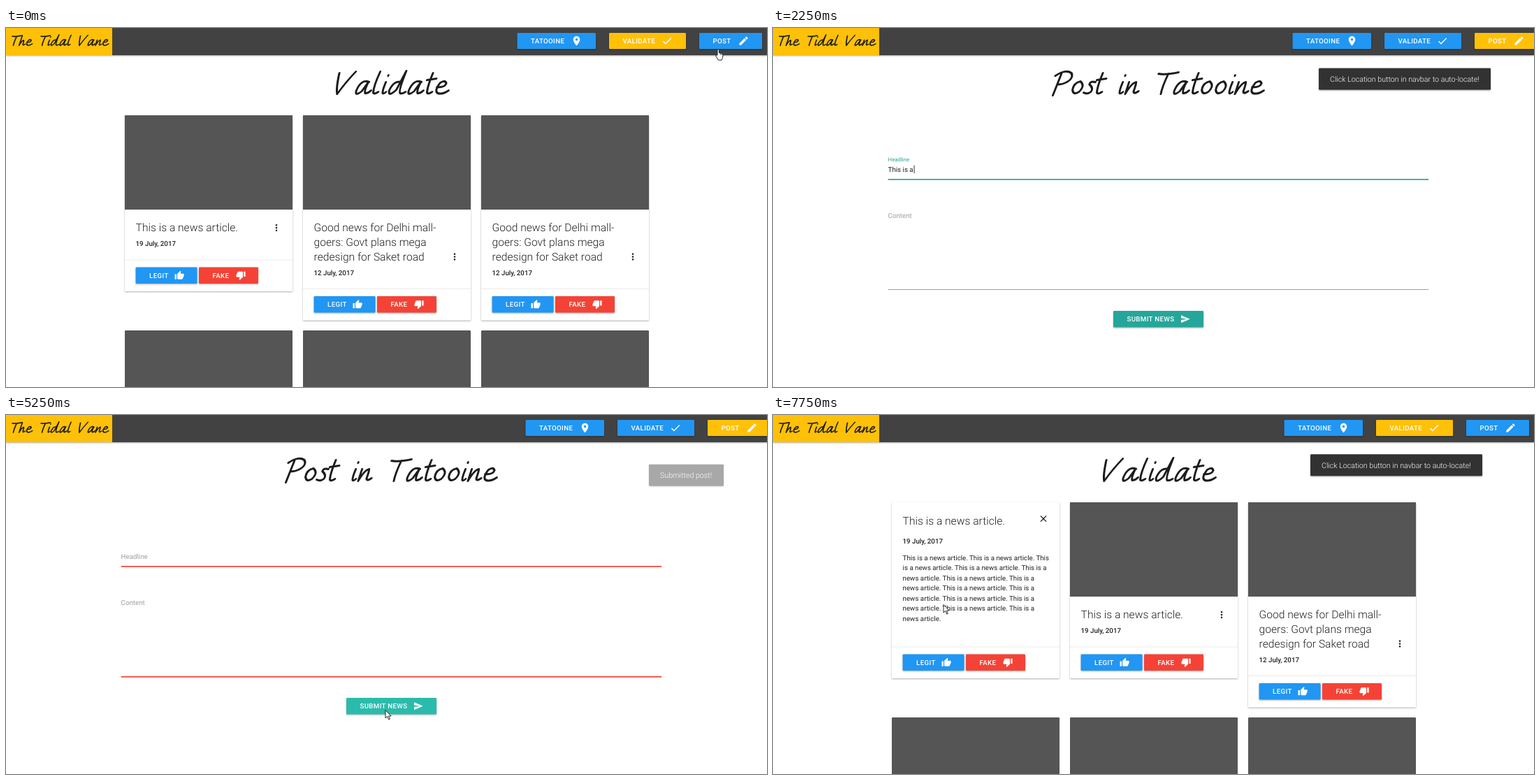
Recreate the animation shown at these times as an HTML page. Size 1089 by 514 pixels, loop 8 s.

```html
<!DOCTYPE html>
<html lang="en">
<head>
<meta charset="utf-8">
<title>News board</title>
<style>
  html, body { margin: 0; width: 100%; height: 100%; overflow: hidden; background: #fff; }
  svg { display: block; width: 100%; height: 100%; }
  text { font-family: Roboto, sans-serif; text-rendering: geometricPrecision; white-space: pre; }
  .btn { font-size: 9.73px; font-weight: 500; letter-spacing: .33px; }
  .body { font-size: 9.73px; }
  .date { font-size: 9.73px; font-weight: 500; }
  .small { font-size: 7.8px; }
  .title { font-size: 15.6px; font-weight: 300; }
  .toast { font-size: 10.7px; font-weight: 300; }
  .tip { font: 8px "Open Sans", sans-serif; }
  .lift { filter: drop-shadow(0 1px 1px rgba(0,0,0,.32)); }
  .script { fill: none; stroke-linecap: round; stroke-linejoin: round; }
</style>
</head>
<body>
<svg id="stage" viewBox="0 0 1089 514" xmlns="http://www.w3.org/2000/svg"></svg>
<script>
const stage = document.getElementById('stage');
const LOOP = 8000, STEP = 250;
const BLUE = '#2196f3', AMBER = '#ffc107', RED = '#f44336', TEAL = '#26a69a';
const GREY = '#9e9e9e', INK = '#212121', SLATE = '#555';
const LINE = 'This is a news article.';
const HINT = 'Click Location button in navbar to auto-locate!';
const STORY = ['Good news for Delhi mall-', 'goers: Govt plans mega', 'redesign for Saket road'];

// Handwritten letters: advance, then pen strokes on a zero baseline
const pen = {
  V: [30, 'M2-30Q3-8 7 0Q14-16 25-32'],
  a: [24, 'M18-17Q6-22 3-5Q3 4 11-4L17-17Q14-3 17-1Q21-1 24-5'],
  l: [14, 'M6-32Q2-12 4-2Q6 1 11-3'],
  i: [9, 'M4-17Q2-3 4-1Q6 0 8-3M5-26v-1'],
  d: [28, 'M17-17Q6-20 3-5Q4 5 13-6L20-33Q16-3 20-1Q23 0 27-3'],
  t: [15, 'M7-30Q4-10 6-2Q8 1 13-3M1-20L14-22'],
  e: [21, 'M3-10Q14-9 15-15Q12-21 6-16Q0-4 7-1Q14 1 21-5'],
  o: [20, 'M11-18Q2-16 3-6Q6 2 13-3Q20-12 11-18'],
  s: [13, 'M13-17Q5-19 5-14Q13-8 10-3Q6 1 0-2'],
  n: [22, 'M4-17L3 0Q8-16 14-17Q15-14 14-4Q15 1 21-4'],
  h: [22, 'M5-31L3 0Q8-16 13-16Q15-13 14-4Q15 1 21-4'],
  P: [27, 'M8-29L4 2M0-26Q12-36 22-30Q28-22 17-16Q12-13 6-14'],
  T: [27, 'M1-29Q10-27 29-31M15-29Q11-10 12 0'],
  ' ': [20, '']
};

// Icons on a 24 unit grid
const thumb = 'M1 21h4V9H1zM23 10c0-1.1-.9-2-2-2h-6.3l1-4.6c.1-.5-.1-1-.4-1.3L14.2 1 7.6 7.6C7.2 8 7 8.4 7 9v10c0 1.1.9 2 2 2h9c.8 0 1.5-.5 1.8-1.2l3-7.1c.1-.2.2-.5.2-.7z';
const icons = {
  pin: 'M12 2C8.1 2 5 5.1 5 9c0 5.3 7 13 7 13s7-7.7 7-13c0-3.9-3.1-7-7-7zm0 9.5a2.5 2.5 0 1 1 0-5 2.5 2.5 0 0 1 0 5z',
  check: 'M9 16.2L4.8 12l-1.4 1.4L9 19 21 7l-1.4-1.4z',
  pencil: 'M3 17.2V21h3.8L17.8 9.9l-3.7-3.7zM20.7 7c.4-.4.4-1 0-1.4l-2.3-2.3c-.4-.4-1-.4-1.4 0l-1.9 1.8 3.8 3.8z',
  send: 'M2 21L23 12 2 3v7l15 2-15 2z',
  close: 'M19 6.4L17.6 5 12 10.6 6.4 5 5 6.4l5.6 5.6L5 17.6 6.4 19l5.6-5.6 5.6 5.6 1.4-1.4-5.6-5.6z',
  dots: 'M12 4a2 2 0 1 0 .01 0zM12 10a2 2 0 1 0 .01 0zM12 16a2 2 0 1 0 .01 0z',
  up: thumb,
  down: thumb
};

const rect = (x, y, w, h, fill, more = '') =>
  `<rect x="${x}" y="${y}" width="${w}" height="${h}" fill="${fill}" ${more}/>`;
const text = (x, y, s, cls, fill = INK, more = '') =>
  `<text x="${x}" y="${y}" class="${cls}" fill="${fill}" ${more}>${s}</text>`;
const icon = (name, x, y, k, fill = '#fff') =>
  `<path d="${icons[name]}" fill="${fill}" transform="translate(${x} ${y}) scale(${k}) ${name === 'down' ? 'rotate(180)' : ''} translate(-12 -12)"/>`;

function script(s, x, y, k, weight) {
  let at = 0, out = '';
  for (const c of s) {
    out += `<path d="${pen[c][1]}" transform="translate(${at}) skewX(-15)"/>`;
    at += pen[c][0];
  }
  return `<g class="script" role="img" aria-label="${s}" stroke="#1c1c1c" stroke-width="${weight / k}" transform="translate(${x} ${y}) scale(${k})">${out}</g>`;
}

function button(x, y, w, h, fill, label, name, iconX, k, ripple) {
  let wave = '';
  if (ripple) {
    const [cx, cy, r] = ripple;
    wave = `<clipPath id="wave">${rect(x, y, w, h, '#000')}</clipPath>
      <circle cx="${cx}" cy="${cy}" r="${r}" fill="#000" opacity=".1" clip-path="url(#wave)"/>`;
  }
  return rect(x, y, w, h, fill, 'rx="1.3" class="lift"') + wave +
    text(x + 19.5, y + h / 2 + 3.5, label, 'btn', '#fff') + icon(name, x + iconX, y + h / 2, k);
}

function nav(posting, ripple) {
  const dx = posting ? 12 : 0;
  const wave = on => on ? ripple : null;
  return rect(0, 0, 1089, 39, '#424242', 'class="lift"') + rect(0, 0, 152, 39, AMBER) +
    script('The Tidal Vane', 5, 25, .457, 1.7) +
    button(731.5 + dx, 7, 112.5, 23, BLUE, 'TATOOINE', 'pin', 85, .68) +
    button(863 + dx, 7, 110, 23, posting ? BLUE : AMBER, 'VALIDATE', 'check', 83, .7, wave(posting)) +
    button(992 + dx, 7, 90, 23, posting ? AMBER : BLUE, 'POST', 'pencil', 63.5, .68, wave(!posting));
}

function card(x, lines, date) {
  const drop = (lines.length - 1) * 20.75, end = 377 + drop;
  return rect(x, 125, 240, end - 125, '#fff', 'rx="1.3" class="lift"') +
    rect(x, 125, 240, 135, SLATE) +
    lines.map((s, i) => text(x + 15.6, 291.2 + i * 20.75, s, 'title')).join('') +
    icon('dots', x + 217, 286 + drop, .65, INK) +
    text(x + 15.6, 312 + drop, date, 'date') +
    rect(x, end - 45.5, 240, 1, '#ebebeb') +
    button(x + 15.6, end - 34.5, 88, 23.5, BLUE, 'LEGIT', 'up', 62.5, .6) +
    button(x + 106, end - 34.5, 85, 23.5, RED, 'FAKE', 'down', 60, .6);
}

function reveal(p) {
  if (!p) return '';
  const long = 'news article. This is a news article. This is a';
  const rows = [`${LINE} ${LINE} This`, `is a ${long}`, long, long, long, long, 'news article.'];
  return `<clipPath id="face">${rect(170, 125, 240, 206, '#000')}</clipPath>
    <g clip-path="url(#face)"><g transform="translate(0 ${206 * (1 - p)})">` +
    rect(170, 125, 240, 206, '#fff') + text(185.6, 157.2, LINE, 'title') +
    icon('close', 387, 148.5, .65, INK) + text(185.6, 183.8, '19 July, 2017', 'date') +
    rows.map((s, i) => text(185.6, 207.8 + i * 14.45, s, 'body')).join('') + '</g></g>';
}

function validatePage(t) {
  const news = [[LINE], '19 July, 2017'], old = [STORY, '12 July, 2017'];
  const cards = [news, t < 1000 ? old : news, old];
  return script('Validate', 467, 94.5, 1, 3) +
    cards.map((c, i) => card(170 + i * 255, ...c) +
      rect(170 + i * 255, 433, 240, 90, SLATE, 'rx="1.3"')).join('') +
    reveal(t < 7250 ? 0 : t < 7500 ? .6 : 1);
}

const typed = t => t < 2250 ? 0 : t < 2500 ? 9 : t < 2750 ? 18 : LINE.length;
function copies(t) {
  const at = [[3000, 1], [3250, 3], [3500, 5], [3750, 8], [4000, 16]];
  return at.reduce((n, [from, count]) => t >= from ? count : n, 0);
}

function field(y, bottom, name, raised, focus, color) {
  const thick = color === GREY ? 1 : 1.7;
  return text(164.6, raised ? y - 15 : y, name, raised ? 'small' : 'body', focus ? TEAL : GREY) +
    rect(164.6, bottom, 773.5, thick, color);
}

function postPage(t) {
  const sent = t >= 5250;
  const onHead = t >= 2000 && t < 2750, onBody = t >= 2750 && t < 4500;
  const head = sent ? '' : LINE.slice(0, typed(t));
  const n = sent ? 0 : copies(t);
  const rows = [Math.min(n, 8), Math.max(n - 8, 0)].map(k => Array(k).fill(LINE).join(' '));
  const hover = t >= 4250 && t < 5500;
  let out = script('Post in Tatooine', 397, 94.5, 1, 3) +
    field(205.8, 216, 'Headline', t >= 2000 && !sent, onHead, t < 2000 ? GREY : onHead ? TEAL : RED) +
    field(272, 374, 'Content', t >= 2750 && !sent, onBody || t === 4500, t < 2750 ? GREY : onBody ? TEAL : RED) +
    text(164.6, 205.8, head, 'body', INK, onHead ? 'id="active"' : '') +
    rows.map((s, i) => text(164.6, 272 + i * 14.4, s, 'body', INK,
      onBody && i === +(n > 8) ? 'id="active"' : '')).join('');
  if (n) out += text(938, 400, `${n * 24}/120`, 'small', INK, 'text-anchor="end"');
  if (t === 3000 || t === 3250) {
    out += `<g opacity="${t === 3250 ? .35 : 1}">` +
      rect(422.5, 290.5, 100, 13.5, '#fff', 'stroke="#767676" class="lift"') +
      text(425.5, 300.5, '120 characters minimum', 'tip', '#575757') + '</g>';
  }
  const fill = t >= 5500 ? '#229186' : hover ? '#2bbbad' : TEAL;
  const wave = t >= 4750 && t < 5250 ? [545, 423, (t - 4500) / 6] : null;
  return out + button(487, 405, 129, 23.5, fill, 'SUBMIT NEWS', 'send', 103, .6, wave);
}

// Toasts rise and fade in with a cubic ease over 300 ms
function toast(t, start, end, right, top, w, s) {
  if (t < start || t >= end) return '';
  const p = 1 - (1 - Math.min((t - start) / 300, 1)) ** 3;
  return `<g opacity="${p}" transform="translate(0 ${22.75 * (1 - p)})">` +
    rect(right - w, top, w, 31, '#323232', 'rx="1.3" class="lift"') +
    text(right - w + 16, top + 19.2, s, 'toast', '#fff') + '</g>';
}

// Pointer tip at each moment; empty spans hide it
const trail = [
  [0, 1015, 30], [250, 1016, 25], [500, 1018, 19], [1000, 814, 63], [1250, 635.5, 161.5], [1500],
  [4250, 560, 400], [4500, 543, 422.5], [5500, 560, 404], [5750, 660, 270], [6000, 850, 80],
  [6250, 910, 23.5], [6500, 808, 40], [6750, 600, 150], [7000, 392, 286],
  [7250, 300, 276], [7500, 252, 272], [7750, 244, 271.5]
];
function pointer(t) {
  const [, x, y] = trail.filter(p => p[0] <= t).pop();
  if (x === undefined) return '';
  const arrow = 'M0 0V11.5L2.7 9 4.6 13.5 6.4 12.7 4.5 8.5H8.2Z';
  const hand = 'M3 9V1.5Q4.2-.3 5.4 1.5V5.6Q11 5.6 11 8.5 11 13 9 16H4.4Q3 13 .5 10 0 7.6 3 9ZM7.2 6v2.5M9.2 6.4v2.3';
  return `<path d="${t < 1000 ? hand : arrow}" transform="translate(${x} ${y})" fill="#fff" stroke="#111" stroke-width=".9"/>`;
}

function statusBar(t) {
  const on = t >= 250 && t <= 1000 || t >= 4250 && t <= 5000;
  return on ? rect(0, 510.5, 366, 4, '#f0f0f0', 'stroke="#e2e2e2" stroke-width=".6"') : '';
}

function draw(t) {
  const posting = t >= 1000 && t < 6500;
  const ripple = t === 750 ? [1018, 19, 40] : t === 6250 ? [911, 23, 38] : null;
  stage.innerHTML = (posting ? postPage(t) : validatePage(t)) + nav(posting, ripple) +
    toast(t, 840, 4250, 1027, 57.5, 246, HINT) +
    toast(t, 5200, 6500, 1027, 57.5, 107, 'Submitted post!') +
    toast(t, 6390, LOOP, 1015, 56.3, 246, HINT) +
    statusBar(t) + pointer(t);
  const active = document.getElementById('active');
  if (active) {
    const x = 165.6 + active.getComputedTextLength(), y = +active.getAttribute('y') - 9.3;
    stage.insertAdjacentHTML('beforeend', rect(x, y, .9, 11.5, INK));
  }
}

let shown = -1;
const begin = performance.now();
function tick(now) {
  const t = Math.floor(Math.max(now - begin, 0) % LOOP / STEP) * STEP;
  if (t !== shown) draw(shown = t);
  requestAnimationFrame(tick);
}
draw(shown = 0);
requestAnimationFrame(tick);
</script>
</body>
</html>
```
